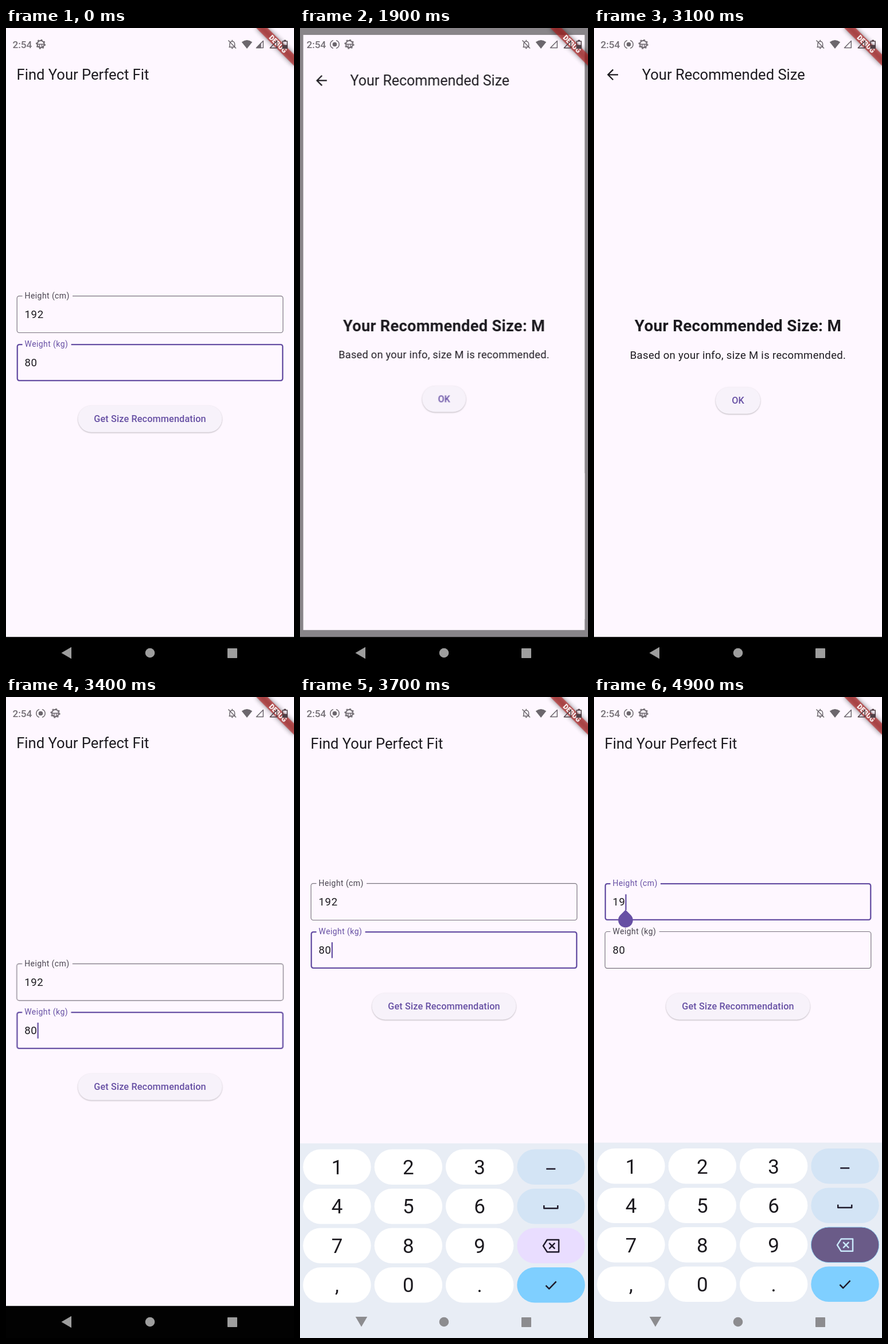
These frames come from a looping animation (502 px wide and 1116 px high, 5000 ms). An HTML page:

```html
<!DOCTYPE html>
<html lang="en">
<head>
<meta charset="utf-8">
<title>Size finder</title>
<style>
  html, body { margin: 0; width: 100%; height: 100%; overflow: hidden; background: #fef7ff; }
  svg { display: block; width: 502px; height: 1116px; overflow: hidden; font-family: Roboto, sans-serif; }
  text { fill: #1d1b20; white-space: pre; }
  .title { font-size: 25.57px; }
  .value { font-size: 18.6px; letter-spacing: .58px; }
  .label { font-size: 13.95px; letter-spacing: .436px; fill: #49454f; }
  .action { font-size: 16.27px; font-weight: 500; letter-spacing: .116px; fill: #6750a4; }
  .head { font-size: 27.9px; font-weight: 700; letter-spacing: .29px; }
  .body { font-size: 18.6px; letter-spacing: .29px; }
  .digit { font-size: 35px; }
  .mid { text-anchor: middle; }
  .line { fill: none; stroke-linejoin: round; }
  .pill { fill: #f7f2fa; filter: drop-shadow(0 1.3px 1px #0004); }
  #page1, #page2 { transform-origin: 251px 530px; }
  #back { transform-origin: 106px 1087px; }
</style>
</head>
<body>
<svg viewBox="0 0 502 1116">
  <g id="page1">
    <rect width="502" height="1116" fill="#fef7ff"/>
    <text class="title" x="18.6" y="90">Find Your Perfect Fit</text>
    <g id="form">
      <g id="fields"></g>
      <text class="value" x="32.6" y="505">19<tspan id="lastDigit">2</tspan></text>
      <text class="value" x="32.6" y="589">80</text>
      <rect id="caret2" x="54.8" y="569" width="2.3" height="27.5" fill="#6750a4"/>
      <rect class="pill" x="125.5" y="657.2" width="251" height="46.5" rx="23.25"/>
      <rect id="press1" x="125.5" y="657.2" width="251" height="46.5" rx="23.25" fill="#6750a4"/>
      <text class="action mid" x="251" y="686.3">Get Size Recommendation</text>
      <g id="caret1" fill="#6750a4">
        <rect x="65.4" y="485.5" width="2.3" height="27.5"/>
        <path d="M66 512.4l9 9a12.8 12.8 0 1 1-18 0z"/>
      </g>
    </g>
  </g>
  <rect id="scrim" width="502" height="1060.5"/>
  <g id="page2">
    <rect width="502" height="1060.2" fill="#fef7ff"/>
    <path class="line" d="M42 81.3H25M33.3 72.4l-8.9 8.9 8.9 8.9" stroke="#1d1b20" stroke-width="2.3" style="stroke-linejoin:miter"/>
    <text class="title" x="83.7" y="90">Your Recommended Size</text>
    <text class="head mid" x="251" y="527.8">Your Recommended Size: M</text>
    <text class="body mid" x="251" y="576.3">Based on your info, size M is recommended.</text>
    <rect class="pill" x="212" y="625.3" width="78" height="46.5" rx="23.25"/>
    <rect id="press2" x="212" y="625.3" width="78" height="46.5" rx="23.25" fill="#6750a4"/>
    <text class="action mid" x="251" y="654.3">OK</text>
  </g>

  <g transform="translate(502 0) rotate(45) scale(1.162)">
    <rect x="-40" y="28" width="80" height="12" opacity=".5" style="filter:blur(3.5px)"/>
    <rect x="-40" y="28" width="80" height="12" fill="#b71c1c" opacity=".63"/>
    <text class="mid" x="0" y="37.6" style="font-size:10.2px;font-weight:900;fill:#fff">DEBUG</text>
  </g>

  <g id="status" fill="#6c676d" stroke="none">
    <text x="11.4" y="34.6" style="font-size:17.2px;font-weight:500;fill:#746f75">2:54</text>
    <g id="record">
      <circle cx="60.5" cy="28.5" r="3.8"/>
      <path class="line" d="M58 21.6a7.2 7.2 0 0 0 0 13.8M63 21.6a7.2 7.2 0 0 1 0 13.8" stroke="#6c676d" stroke-width="1.5"/>
    </g>
    <g id="gear" class="line" stroke="#6c676d">
      <circle cx="60.5" cy="28.2" r="6.1" stroke-width="2"/>
      <circle cx="60.5" cy="28.2" r="7.6" stroke-width="1.9" stroke-dasharray="2.6 3.37"/>
      <path d="M54.5 28.2h12M58.5 28.2v5.5M62.5 28.2v5.5" stroke-width="1.6"/>
    </g>
    <g class="line" stroke="#6c676d" stroke-width="1.5">
      <path d="M388.5 33.2h11M390 33v-5.5a4.3 4.3 0 0 1 8.6 0V33M394.3 23v-2.2M387.5 21.5l13.5 14"/>
    </g>
    <path d="M394.3 36.4a1.8 1.8 0 0 1-1.8-1.8h3.6a1.8 1.8 0 0 1-1.8 1.8z"/>
    <path d="M410.8 24.6Q420 17.4 429.2 24.6L420 35.9z"/>
    <path class="line" d="M436.5 34.6h11.8V22.4z" stroke="#6c676d" stroke-width="1.5"/>
    <path id="signal" d="M435.5 35.2h9.2V25z"/>
    <g class="line" stroke="#4f3f45" stroke-width="1.5">
      <path d="M460.3 34.8h11.8V22.6z"/>
      <path d="M482.2 23h8v12.4h-8zM484.4 21.4h3.6"/>
    </g>
    <path d="M482 29.5h8.4v6H482z" fill="#4f3f45"/>
  </g>

  <rect id="navBar" y="1060.2" width="502" height="56"/>
  <g id="keyboard">
    <rect y="775.8" width="502" height="700" fill="#e8edf5"/>
    <g id="keys"></g>
  </g>
  <g id="nav">
    <path id="back" d="M96.5 1088l17.5-10.3v20.6z"/>
    <circle cx="251" cy="1088" r="8.3"/>
    <rect x="386" y="1080" width="17" height="17" rx=".8"/>
  </g>
</svg>
<script>
const LOOP = 5000, FRAME = 100;
const $ = id => document.getElementById(id);
const GRAY = '#79747e', PURPLE = '#6750a4';

// Outlined box with a gap in the top edge for the label.
function outline(id, top, gapEnd, width, color) {
  const i = width / 2, r = 4.65 - i;
  const l = 18.6 + i, R = 483.4 - i, t = top + i, b = top + 65.1 - i;
  const arc = (x, y) => `a${r} ${r} 0 0 1 ${x * r} ${y * r}`;
  return `<path id="${id}" class="line" stroke="${color}" stroke-width="${width}"
    d="M${gapEnd} ${t}H${R - r}${arc(1, 1)}V${b - r}${arc(-1, 1)}H${l + r}${arc(-1, -1)}V${t + r}${arc(1, -1)}H28.6"/>`;
}
function field(n, top, gapEnd, label) {
  return outline('thin' + n, top, gapEnd, 1.16, GRAY) +
    outline('thick' + n, top, gapEnd, 2.32, PURPLE) +
    `<text id="label${n}" class="label" x="32.6" y="${top + 5.2}">${label}</text>`;
}
$('fields').innerHTML = field(1, 466, 116, 'Height (cm)') + field(2, 549.9, 113.6, 'Weight (kg)');

// Keypad: three digit columns and one column of icons.
const icons = [
  'M-8 3H8',
  'M-12-2V3.2H12V-2',
  'M-13.3 0L-6.5-10.6H13.8V10.6H-6.5zM-3-5L7 5M7-5L-3 5',
  'M-8.8.5L-3 6.3L9.3-6.5'
];
const tints = ['#d3e4f5', '#d3e4f5', '#e9ddff', '#7fcfff'];
let keys = '';
['123', '456', '789', ',0.'].forEach((row, r) => {
  const y = 816.8 + 68.5 * r;
  for (let c = 0; c < 4; c++) {
    const x = 64.5 + 124.35 * c, icon = c === 3;
    keys += `<rect ${icon ? `id="key${r}"` : ''} x="${x - 59.2}" y="${y - 30.8}" width="118.4" height="61.6" rx="30.8" fill="${icon ? tints[r] : '#fff'}"/>`;
    keys += icon
      ? `<path id="icon${r}" class="line" transform="translate(${x - .3} ${y + .4})" d="${icons[r]}" stroke="#1f1a2b" stroke-width="2.5"/>`
      : `<text class="digit mid" x="${x}" y="${y + 12.8}">${row[c]}</text>`;
  }
});
$('keys').innerHTML = keys;

// Each step is [ms, value, easing towards the next step].
const tracks = [];
function track(id, prop, steps, ease = 'linear') {
  const frames = steps.map(([t, v, e]) => ({ offset: t / LOOP, [prop]: v, easing: e || ease }));
  if (frames[0].offset > 0) frames.unshift({ ...frames[0], offset: 0, easing: 'linear' });
  const last = frames[frames.length - 1];
  if (last.offset < 1) frames.push({ ...last, offset: 1 });
  const anim = $(id).animate(frames, { duration: LOOP, iterations: Infinity });
  anim.pause();
  tracks.push(anim);
}
const HOLD = 'step-end', ZOOM = 'cubic-bezier(.2,0,0,1)', SLIDE = 'cubic-bezier(.4,0,.2,1)';
const scale = k => `scale(${k})`, moveX = x => `translateX(${x}px)`, moveY = y => `translateY(${y}px)`;
const toggle = (id, ...steps) => track(id, 'opacity', [[0, 0], ...steps], HOLD);

// Status bar
track('signal', 'opacity', [[0, 1], [200, 0]], HOLD);
track('gear', 'transform', [[300, moveX(0)], [500, moveX(25.5)]]);
track('record', 'opacity', [[400, 0], [600, 1]]);

// Opening the result page
toggle('press1', [1700, .1], [1900, 0]);
track('page2', 'opacity', [[1810, 0], [1850, 1], [3190, 1], [3240, 0]]);
track('page2', 'transform', [[1764, scale(.85), ZOOM], [2064, scale(1)], [3185, scale(1), ZOOM], [3485, scale(.9)]]);
track('scrim', 'opacity', [[1815, 0], [1900, .46], [1930, .6], [2100, .6, HOLD], [2101, 0]]);

// Going back, with the keyboard rising
toggle('press2', [3200, .1], [3300, 0]);
track('page1', 'transform', [[0, scale(1), HOLD], [3164, scale(1.1), ZOOM], [3464, scale(1)]]);
track('form', 'transform', [[3380, moveY(0), SLIDE], [3650, moveY(-142)]]);
track('keyboard', 'transform', [[3380, moveY(345), SLIDE], [3670, moveY(1.4), HOLD], [3800, moveY(0)]]);
track('navBar', 'opacity', [[3400, 1], [3490, 0]]);
track('nav', 'fill', [[3400, '#9e9e9e'], [3500, '#bab4bf'], [3600, '#8c8c8f']]);
track('back', 'transform', [[3460, 'rotate(0deg)'], [3500, 'rotate(-24deg)'], [3620, 'rotate(-90deg)']]);
toggle('caret2', [3300, 1], [3800, 0]);

// Focus moves from weight to height
const focus = (id, prop, a, b) => track(id, prop, [[4000, a], [4200, b]]);
focus('thin1', 'opacity', 1, 0);
focus('thick1', 'opacity', 0, 1);
focus('thin2', 'opacity', 0, 1);
focus('thick2', 'opacity', 1, 0);
focus('label1', 'fill', '#49454f', PURPLE);
focus('label2', 'fill', PURPLE, '#49454f');
toggle('caret1', [4200, 1]);

// Backspace
track('key2', 'fill', [[0, tints[2]], [4700, '#6a5b88']], HOLD);
track('key2', 'stroke', [[0, 'transparent'], [4700, '#8fcdf0']], HOLD);
track('icon2', 'stroke', [[0, '#1f1a2b'], [4700, '#c9e8fb']], HOLD);
track('lastDigit', 'fill', [[0, '#1d1b20'], [4800, 'transparent']], HOLD);
track('caret1', 'transform', [[0, moveX(0)], [4800, moveX(-11)]], HOLD);

// The screen refreshes ten times a second.
const start = performance.now();
function draw() {
  const t = (performance.now() - start) % LOOP;
  const at = Math.floor(t / FRAME) * FRAME + 1;
  for (const anim of tracks) anim.currentTime = at;
  requestAnimationFrame(draw);
}
draw();
</script>
</body>
</html>
```
